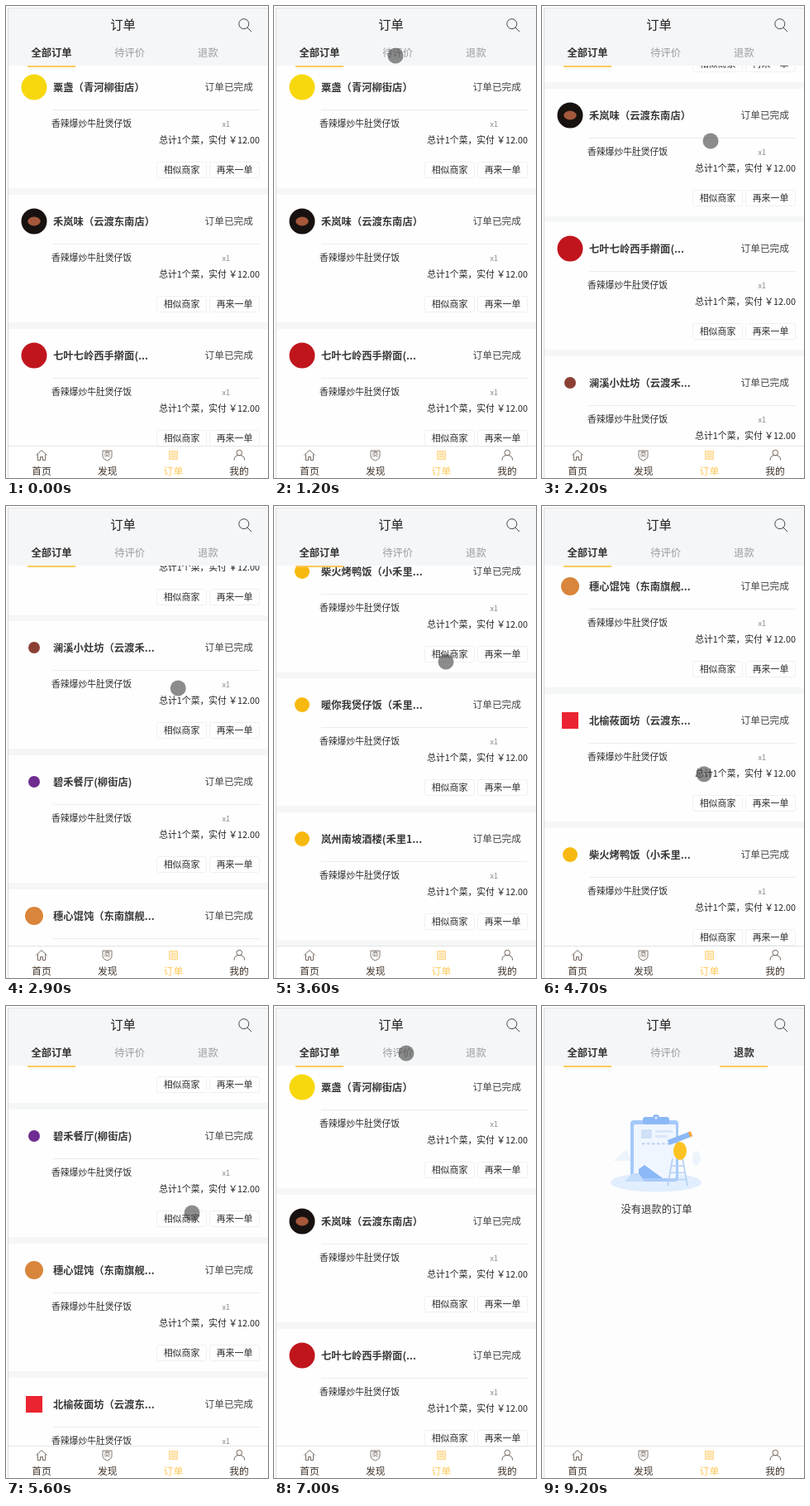
An HTML page with a canvas that plays this animation: 317x570 px, repeating every 10 s.

```html
<!DOCTYPE html>
<html lang="zh-CN">
<head>
<meta charset="utf-8">
<title>订单</title>
<style>
html, body { margin: 0; width: 100%; height: 100%; overflow: hidden; background: #fff; }
canvas { display: block; width: 317px; height: 570px; }
</style>
</head>
<body>
<canvas id="stage"></canvas>
<script>
const W = 317, H = 570, LOOP = 10000, STEP = 100;
const FONT = '"Noto Sans CJK SC", "Noto Sans CJK", "Noto Sans", sans-serif';
const PITCH = 161.8, TOP = 72, FOOT = 531;
const YELLOW = '#ffc95a', PALE = '#e1eefe', BLUE = '#8bb8f6';

const canvas = document.getElementById('stage');
const dpr = window.devicePixelRatio || 1;
canvas.width = W * dpr;
canvas.height = H * dpr;
const ctx = canvas.getContext('2d');

const shops = [
  { name: '粟盏（青河柳街店）', color: '#f7d80f', r: 15.5 },
  { name: '禾岚味（云渡东南店）', color: '#17120f', r: 15.5, glow: '#a5583c' },
  { name: '七叶七岭西手擀面(...', color: '#c1151d', r: 15.5 },
  { name: '澜溪小灶坊（云渡禾...', color: '#8c4034', r: 7 },
  { name: '碧禾餐厅(柳街店)', color: '#6f2c91', r: 7 },
  { name: '穗心馄饨（东南旗舰...', color: '#d9853b', r: 11 },
  { name: '北榆莜面坊（云渡东...', color: '#ea2430', r: 10, square: true },
  { name: '柴火烤鸭饭（小禾里...', color: '#f7b90f', r: 9 },
  { name: '暖你我煲仔饭（禾里...', color: '#f7b90f', r: 9 },
  { name: '岚州南坡酒楼(禾里1...', color: '#f7b90f', r: 9 }
];

// Each swipe eases the list to a new offset.
const swipes = [
  { at: 2000, ms: 500, to: 371 },
  { at: 2800, ms: 500, to: 800 },
  { at: 3300, ms: 300, to: 1152 },
  { at: 3900, ms: 500, to: 927 },
  { at: 4500, ms: 500, to: 588 },
  { at: 5600, ms: 1000, to: 0 }
];

// Turning points of the finger: time, x, y
const turns = [
  [400, 302, 36], [700, 235, 73], [1200, 147, 60], [1700, 147, 60],
  [1900, 175, 328], [2200, 204, 163], [2700, 206, 400], [3000, 209, 160],
  [3300, 207, 400], [3600, 208, 188], [4100, 200, 330], [4500, 195, 205],
  [5000, 198, 549], [5600, 225, 250], [6000, 212, 515], [7000, 160, 57],
  [7300, 160, 57], [8200, 245, 58], [8900, 244, 57], [9200, 316, 62]
];

const clamp = v => Math.min(1, Math.max(0, v));
const ease = v => (1 - Math.cos(Math.PI * clamp(v))) / 2;
const mix = (a, b, k) => a + (b - a) * k;

function offset(t) {
  return swipes.reduce((pos, s) => mix(pos, s.to, ease((t - s.at) / s.ms)), 0);
}

function finger(t) {
  const i = turns.findIndex(p => p[0] > t);
  const [t0, x0, y0] = turns[i - 1], [t1, x1, y1] = turns[i];
  const k = ease((t - t0) / (t1 - t0));
  return [mix(x0, x1, k), mix(y0, y1, k)];
}

function rect(x, y, w, h, color) {
  ctx.fillStyle = color;
  ctx.fillRect(x, y, w, h);
}

function disc(x, y, r, color, ry = r) {
  ctx.fillStyle = color;
  ctx.beginPath();
  ctx.ellipse(x, y, r, ry, 0, 0, Math.PI * 2);
  ctx.fill();
}

function round(x, y, w, h, r, color) {
  ctx.fillStyle = color;
  ctx.beginPath();
  ctx.roundRect(x, y, w, h, r);
  ctx.fill();
}

function fill(path, color) {
  ctx.fillStyle = color;
  ctx.fill(new Path2D(path));
}

function stroke(path, color, width = 1) {
  ctx.strokeStyle = color;
  ctx.lineWidth = width;
  ctx.stroke(new Path2D(path));
}

// y is the middle of the glyphs
function text(str, x, y, size, color, align = 'left', weight = 400) {
  ctx.font = `${weight} ${size}px ${FONT}`;
  ctx.textAlign = align;
  ctx.fillStyle = color;
  ctx.fillText(str, x, y + size * 0.38);
}

function avatar({ color, r, square, glow }, x, y) {
  if (square) rect(x - r, y - r, r * 2, r * 2, color);
  else disc(x, y, r, color);
  if (glow) disc(x, y, r * 0.5, glow, r * 0.35);
}

function button(label, x, y) {
  ctx.strokeStyle = '#f0f0f0';
  ctx.lineWidth = 1;
  ctx.beginPath();
  ctx.roundRect(x + 0.5, y - 9.5, 60, 19, 2);
  ctx.stroke();
  text(label, x + 30.5, y, 10.9, '#2c2c2c', 'center');
}

function card(shop, y) {
  rect(3, y - 32, W - 3, 154, '#fefefe');
  avatar(shop, 34, y);
  text(shop.name, 57, y, 12.3, '#383838', 'left', 700);
  text('订单已完成', 299, y, 11.7, '#444', 'right');
  rect(57, y + 27, 250, 1, '#ececec');
  text('香辣爆炒牛肚煲仔饭', 55, y + 44, 10.8, '#2c2c2c');
  text('x1', 271, y + 44.5, 9, '#888', 'right');
  text('总计1个菜，实付 ￥12.00', 307, y + 64, 10.8, '#222', 'right');
  button('相似商家', 182, y + 100);
  button('再来一单', 246, y + 100);
}

function list(pos) {
  rect(3, TOP, W - 3, FOOT - TOP, '#f5f6f6');
  shops.forEach((shop, i) => card(shop, Math.round(98 + PITCH * i - pos)));
}

function ladder(x, y, h) {
  for (const side of [-1, 1]) {
    stroke(`M${x + side * 6} ${y} l${side * 6} ${h}`, '#b7d1f5', 1.7);
  }
  for (let i = 1; i < 4; i++) {
    const half = 6 + i * 1.5;
    rect(x - half, y + i * h / 4, half * 2, 1.6, '#b7d1f5');
  }
}

function picture() {
  disc(138, 213, 55, PALE, 11.5);
  fill('M86 187 L102 174 L110 187 Z', '#eef4fc');
  disc(187, 184, 5, '#eef4fc', 9);

  round(107, 138, 58, 74, 4, '#a5c9fa');
  round(111, 143, 51, 65, 2, '#f0f6ff');
  round(122, 134, 32, 9, 3, BLUE);
  disc(138, 135, 4, BLUE);
  disc(138, 135, 1.6, PALE);

  rect(120, 149, 13, 11, '#cfe0f7');
  for (let i = 0; i < 2; i++) rect(137, 150 + i * 6, 21 - i * 6, 3, '#d9e6f8');
  for (let i = 0; i < 6; i++) rect(121 + i * 6, 165, 3.5, 2.5, '#c3d7f3');
  fill('M117 208 V197 L124 192 L146 208 Z', BLUE);
  fill('M100 212 L109 202 H117 L124 212 Z', '#c5dcfb');

  ladder(164, 184, 33);
  disc(167, 175, 8, '#fdc323', 11);
  stroke('M153 165 L179 155', BLUE, 6.5);
  stroke('M178 155.4 L181 154.2', '#f4a644', 6.5);
}

function empty(label, loaded) {
  rect(3, TOP, W - 3, FOOT - TOP, '#fdfdfd');
  if (loaded) picture();
  text(label, 138.5, 245, 12.3, '#333', 'center');
}

function header(t) {
  rect(0, 0, W, TOP, '#fff');
  rect(3, 3, W - 3, TOP - 3, '#f5f6f8');
  rect(2, 2, W - 2, 1, '#e4e4e6');
  text('订单', 141.5, 22, 15.3, '#222', 'center');
  ctx.beginPath();
  ctx.arc(287.8, 21.6, 6, 0, Math.PI * 2);
  ctx.moveTo(292, 26);
  ctx.lineTo(297, 31);
  ctx.strokeStyle = '#444';
  ctx.lineWidth = 1;
  ctx.stroke();

  const active = [true, t >= 7200 && t < 8700, t >= 8700];
  ['全部订单', '待评价', '退款'].forEach((label, i) => {
    const x = 55 + i * 94.7;
    text(label, x, 56, 12.3, active[i] ? '#333' : '#9b9c9e', 'center', active[i] ? 700 : 500);
    if (active[i]) rect(Math.round(x - 29), TOP, 58, 2, YELLOW);
  });
}

function footer() {
  const ink = '#75685e';
  rect(0, FOOT, W, H - FOOT, '#fff');
  rect(3, FOOT, W - 3, 1, '#e2e6e6');
  stroke('M36.5 542.5 l6.5 -6 l6.5 6 M38.5 541.5 v7 h3 v-4 h3 v4 h3 v-7', ink);
  stroke('M117 537 h11 v7 q0 3 -5.5 5 q-5.5 -2 -5.5 -5 Z', ink, 0.9);
  text('商', 122.5, 541.5, 7.5, ink, 'center');
  round(197, 537, 11, 11, 1.5, '#ffecc4');
  stroke('M197.5 537.5 h10 v10 h-10 Z M200 541 h5 M200 544 h5', '#ffd484', 0.9);
  stroke('M279 539.5 a3.3 3.3 0 1 1 6.6 0 a3.3 3.3 0 1 1 -6.6 0 M276 548.5 q0 -6 6.3 -6 q6.3 0 6.3 6', ink);
  ['首页', '发现', '订单', '我的'].forEach((label, i) => {
    text(label, 43 + i * 79.7, 562, 11.8, i === 2 ? YELLOW : '#40342b', 'center');
  });
}

function draw(t) {
  ctx.setTransform(dpr, 0, 0, dpr, 0, 0);
  rect(0, 0, W, H, '#fff');
  if (t < 7200) list(offset(t));
  else empty(t < 8700 ? '没有评价的订单' : '没有退款的订单', t >= 7400);
  header(t);
  footer();
  rect(2, 2, 1, H - 2, '#dcdcdc');
  if (t >= 400 && t < 9200) disc(...finger(t), 9.5, 'rgba(70,70,70,.62)');
}

const start = performance.now();
function tick(now) {
  const t = Math.max(0, now - start) % LOOP;
  draw(Math.floor(t / STEP) * STEP);
  requestAnimationFrame(tick);
}
draw(0);
requestAnimationFrame(tick);
</script>
</body>
</html>
```
